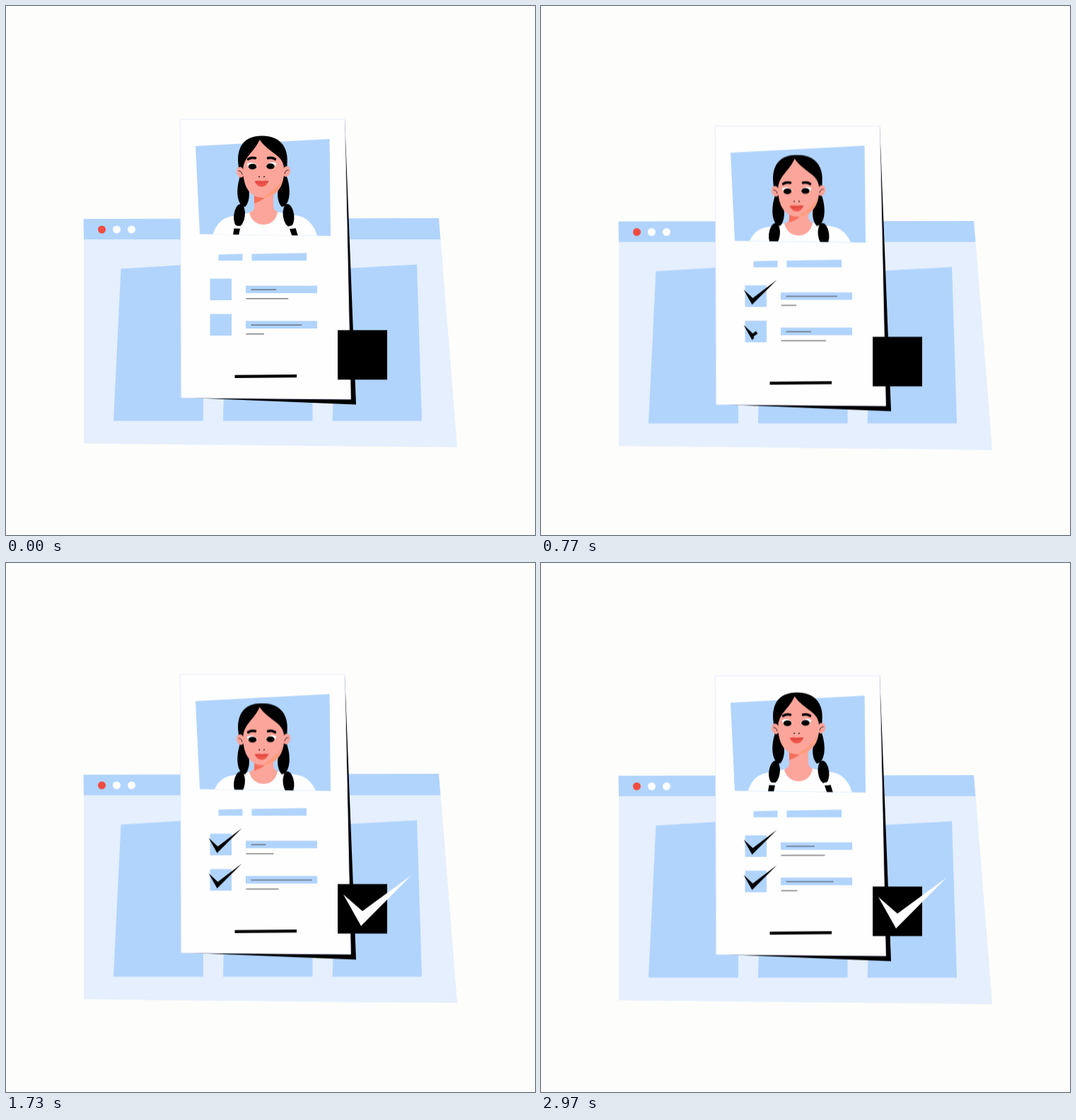
An HTML page that plays this animation: 748x748 px, repeating every 3010 ms.

```html
<!DOCTYPE html>
<html lang="en">
<head>
<meta charset="utf-8">
<title>Profile checklist</title>
<style>
  html, body { margin: 0; width: 100%; height: 100%; overflow: hidden; background: #fdfdfb; }
  svg { display: block; width: 100vw; height: 100vh; }

  .blue { fill: #b1d4fd; }
  .pale { fill: #e5effd; }
  .white { fill: #fefefe; }
  .skin { fill: #fca59b; }
  .red { fill: #f24b40; }
  .thin { fill: none; stroke: #000; stroke-linecap: round; }

  /* Gentle sine drift, starting at its middle and moving down */
  .float { animation: float 1505ms cubic-bezier(.37, 0, .63, 1) -752.5ms infinite alternate; }
  @keyframes float {
    from { transform: translateY(calc(-1 * var(--a))); }
    to { transform: translateY(var(--a)); }
  }

  .push, .head, .face, .body, .eyes, .brows { animation: 3010ms ease-in-out infinite; }
  .push { animation-name: push; }
  @keyframes push {
    0%, 4% { transform: none; }
    15.5%, 18% { transform: translateY(5px); }
    38%, 100% { transform: none; }
  }

  .head { --d: 17.5px; animation-name: nod; }
  .face { --d: 8px; animation-name: nod; }
  .body { --d: 6px; animation-name: nod; }
  @keyframes nod {
    0%, 1% { transform: none; }
    14%, 58% { transform: translateY(var(--d)); }
    77%, 100% { transform: none; }
  }

  .eyes { animation-name: blink; transform-origin: 361px 227px; }
  @keyframes blink {
    0%, 68% { transform: none; }
    71%, 73.5% { transform: scaleY(0); }
    77%, 100% { transform: none; }
  }
  .brows { animation-name: frown; }
  @keyframes frown {
    0%, 68% { transform: none; }
    71%, 73.5% { transform: translateY(2px); }
    77%, 100% { transform: none; }
  }

  .line {
    fill: #444;
    height: 1px;
    animation: stretch 752.5ms cubic-bezier(.37, 0, .63, 1) var(--t) infinite alternate;
  }
  @keyframes stretch {
    from { width: var(--a); }
    to { width: var(--b); }
  }

  .reveal { fill: none; stroke: #fff; stroke-dasharray: 1 2; animation: 3010ms linear infinite; }
  .first { animation-name: first; }
  .second { animation-name: second; }
  .third { animation-name: third; }
  @keyframes first {
    0%, 9.3% { stroke-dashoffset: 1.02; }
    20.5%, 100% { stroke-dashoffset: 0; }
  }
  @keyframes second {
    0%, 21.5% { stroke-dashoffset: 1.02; }
    32.5%, 100% { stroke-dashoffset: 0; }
  }
  @keyframes third {
    0%, 33.3% { stroke-dashoffset: 1.02; }
    45%, 100% { stroke-dashoffset: 0; }
  }
</style>
</head>
<body>
<svg viewBox="0 0 748 748">
  <defs>
    <path id="tick" d="M286.5 391.5L299.5 403.5L333.5 377.8L298.5 412.7Z"/>
    <path id="sweep" pathLength="1" d="M283 386L299 409L338 372"/>
    <mask id="m1" maskUnits="userSpaceOnUse" x="270" y="360" width="80" height="70">
      <use href="#sweep" class="reveal first" stroke-width="18"/>
    </mask>
    <mask id="m2" maskUnits="userSpaceOnUse" x="270" y="360" width="80" height="70">
      <use href="#sweep" class="reveal second" stroke-width="18"/>
    </mask>
    <mask id="m3" maskUnits="userSpaceOnUse" x="460" y="430" width="130" height="110">
      <path class="reveal third" stroke-width="30" pathLength="1" d="M472 466L503 507L582 438"/>
    </mask>
    <clipPath id="crop"><path d="M262 150H462L459 325L274 322.5Z"/></clipPath>
  </defs>

  <g class="float" style="--a:3.6px">
    <path class="pale" d="M110 329H614.5L638 624L110 618.5Z"/>
    <path class="blue" d="M109.5 301L612 300L614.5 330H110Z"/>
    <circle class="red" cx="135.5" cy="316" r="5.5"/>
    <circle class="white" cx="156.5" cy="316" r="5.5"/>
    <circle class="white" cx="177.5" cy="316" r="5.5"/>
    <path class="blue" d="M162.5 371.5L279 364.5V586.5H152Z"/>
    <path class="blue" d="M312 370L433.5 365V586.5H307Z"/>
    <path class="blue" d="M470 371.5L581 365.5L588 586.5H461.5Z"/>
  </g>

  <g class="float" style="--a:6px"><g class="push">
    <path d="M479 160L495 563.5L248 553.5Z"/>
    <path class="white" stroke="#e2e7ff" stroke-width=".8" d="M246.3 160H479L487.5 556L247.7 554Z"/>
    <path class="blue" d="M268 198L457.5 188L459 325L274 322.5Z"/>

    <g clip-path="url(#crop)">
      <g class="body">
        <path class="white" d="M289 340C292 316 301 299 321 297Q336 295 347 291H383Q398 294 410 296C431 299 440 316 443 340Z"/>
        <path class="skin" d="M350 255H378V284Q379 289 384 291C382 303 374 309 364 309C354 309 346 302 344 292Q351 290 351 284Z"/>
      </g>
      <g class="head">
        <path fill="#f6705b" d="M351 262H372Q366 275 351 279Z"/>
        <path d="M331 241C345 246 348 274 338 284C327 283 324 261 331 241Z"/>
        <path d="M397 241C383 246 380 274 390 284C401 283 404 261 397 241Z"/>
        <ellipse cx="330" cy="296" rx="7.8" ry="16" transform="rotate(7 330 296)"/>
        <ellipse cx="399.5" cy="296" rx="7.8" ry="16" transform="rotate(-7 399.5 296)"/>
        <path d="M322.5 314L331 314.5L328.5 327H320.5ZM401 315L409.5 314L413.5 327H405Z"/>
        <path class="white" d="M321 310.5L332 311L331 314.5H321ZM400 311L410 310L411 314L401 315Z"/>
        <path d="M331 246Q329 234 328.5 224C326 200 336 183.5 362 183.5C388 183.5 400 200 397.5 224Q398 236 395 247Q364 262 331 246Z"/>
        <ellipse class="skin" cx="331.5" cy="235" rx="5.5" ry="7.5" transform="rotate(-15 331.5 235)"/>
        <ellipse class="skin" cx="396.5" cy="234" rx="5.5" ry="7.5" transform="rotate(15 396.5 234)"/>
        <path class="thin" stroke-width=".8" d="M329 233Q333 233 334 238M399 232Q395 232 394 237"/>
        <path class="skin" d="M358.5 189C352 205 338 212 335.5 228C334 250 342 271 363 271C385 271 395 250 393 228C391 210 372 208 358.5 189Z"/>
        <path fill="#ff9d7c" d="M390.5 246C386 262 376 270 364 271C370 265 378 261 384 254Z"/>
        <g class="face">
          <path class="brows thin" stroke-width="3.6" d="M342.5 216.5Q347 213.5 352.5 215M370.5 215Q376 213.5 380.5 216.5"/>
          <g class="eyes">
            <path class="white" d="M340.5 223Q348 218.5 355.5 226Q349 233 343 228ZM382.5 222.5Q375 218 367.5 225.5Q374 232.5 380 227.5Z"/>
            <ellipse cx="348.5" cy="227" rx="5.8" ry="4"/>
            <ellipse cx="374" cy="226.5" rx="5.8" ry="4"/>
          </g>
          <path class="thin" stroke-width="1.3" d="M357.5 241.2L358.5 241.5M364.5 241.5L365.5 241.2"/>
          <path fill="#ee554c" d="M351.5 248Q357 246 361.5 247.3Q366 246 371.5 247.5Q368 255.5 361.5 255.5Q355 255.5 351.5 248Z"/>
          <path fill="none" stroke="#c93a39" stroke-width=".8" d="M352 248.2Q361.5 252 371 247.8"/>
        </g>
      </g>
    </g>

    <path class="blue" d="M300.5 351.5L334.5 350.5V360H300.5ZM347.5 350.5L425 349.3V360H347.5Z"/>
    <path class="blue" d="M288.5 385.5H319V416H288.5ZM288.5 435.5H319V466H288.5Z"/>
    <path class="blue" d="M339 395.5H440V406H339ZM339 445.3H440V456H339Z"/>
    <rect class="line" x="346.5" y="400.5" style="--a:21px;--b:85px;--t:-1265ms"/>
    <rect class="line" x="339.5" y="413.3" style="--a:65px;--b:15px;--t:-160ms"/>
    <rect class="line" x="346.5" y="450.5" style="--a:86px;--b:23px;--t:-1265ms"/>
    <rect class="line" x="339.5" y="463.3" style="--a:20px;--b:70px;--t:-160ms"/>
    <path d="M323.5 521.8L411 521V525.2L323.5 526Z"/>

    <g mask="url(#m1)"><use href="#tick"/></g>
    <g transform="translate(0 50)"><g mask="url(#m2)"><use href="#tick"/></g></g>
  </g></g>

  <g class="float" style="--a:9.5px">
    <rect x="469" y="458.3" width="70" height="70"/>
    <g mask="url(#m3)">
      <path class="white" d="M477 473L504 496.5L573.5 445.5L502 517.5Z"/>
    </g>
  </g>
</svg>
</body>
</html>
```
